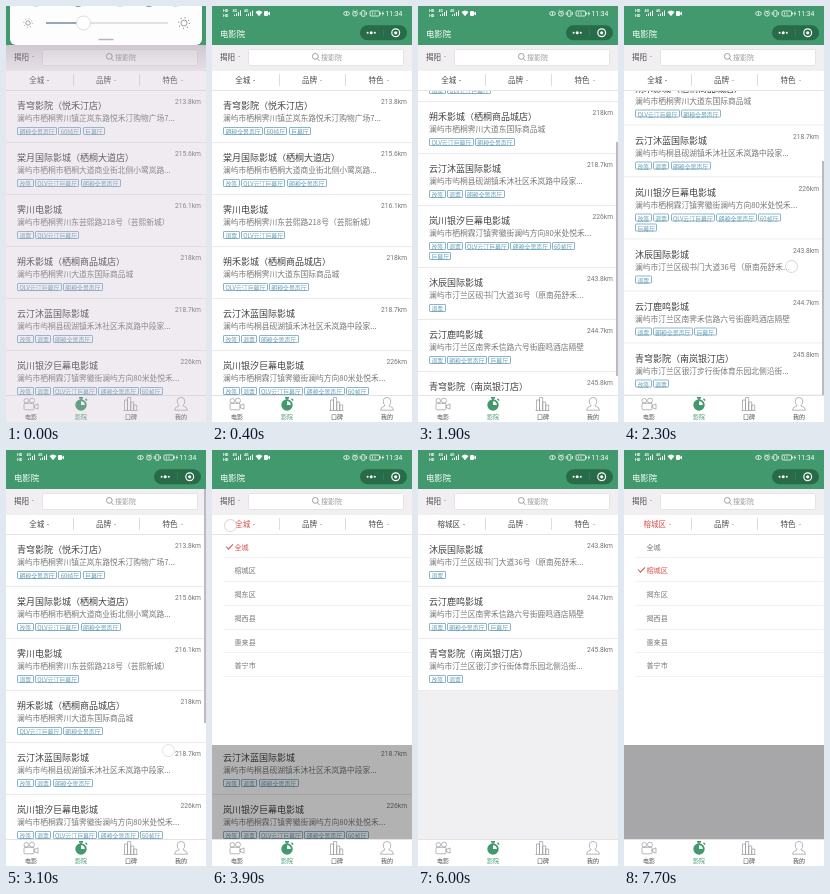
Write an HTML page that moves like this. It is 200x416 px and loops after 8 s.

```html
<!DOCTYPE html>
<html lang="zh-CN">
<head>
<meta charset="utf-8">
<title>电影院</title>
<style>
@property --s { syntax: "<number>"; inherits: true; initial-value: 0; }
html, body { margin: 0; width: 100%; height: 100%; overflow: hidden; }
body { font-family: "Noto Sans CJK SC", "Noto Sans CJK", "Noto Sans", sans-serif; color: #4a4a4a; }
.stage { position: relative; width: 200px; height: 416px; overflow: hidden; background: #f0eff2;
  animation: scroll 8s step-end infinite; }
.stage * { box-sizing: border-box; }
.abs, .view, .item > *, .head, .search, .filter, .menu, .tabs, .thumb, .touch, .wash, .shade { position: absolute; }
svg { position: absolute; left: 0; top: 0; overflow: visible; }

.head { inset: 0 0 auto; height: 39px; background: #41996d; color: #fff; }
.head b { position: absolute; left: 8px; top: 21px; font-size: 8.4px; font-weight: 500; line-height: 12px; }
.search { top: 39px; width: 200px; height: 25.5px; background: #f2eff2; font-size: 7.5px; line-height: 12px; }
.search .box { left: 36px; top: 4px; width: 156px; height: 16.5px; background: #fff; border: .5px solid #e6e3e6; border-radius: 1.5px;
  font-size: 7px; line-height: 15.5px; color: #999; padding-left: 72px; }
.filter { top: 64.5px; width: 200px; height: 20px; background: #fff; border-bottom: .5px solid #e6e4e6; font-size: 7.5px; }
.filter .cell { position: absolute; top: 0; width: 66.6px; height: 17.5px; display: flex; align-items: center; justify-content: center; gap: 3px; }
.line { position: absolute; top: 3px; width: .6px; height: 12px; background: #dcdcdc; }
.caret { border: 1.5px solid transparent; border-top: 1.8px solid; border-bottom: 0; color: #8a8a8a; }
.cell .caret { margin-top: 2.5px; }
.area { animation: active 8s step-end infinite; }
.area .caret { color: inherit; animation: flip 8s step-end infinite; }

.view { top: 84.5px; width: 200px; height: 304.5px; overflow: hidden; }
.list { transform: translateY(calc(var(--s) * -1px)); }
.item { position: relative; height: 52px; background: #fff; border-bottom: .6px solid #ebe9eb; }
.item.tall { height: 62px; }
.item > * { white-space: nowrap; left: 11px; }
.name { top: 8px; font-size: 9px; line-height: 13px; color: #424242; }
.addr { top: 21.5px; font-size: 7.75px; line-height: 12px; color: #777; }
.item .km { left: auto; right: 5px; top: 6px; font: 6.7px/10px Roboto, "Noto Sans", sans-serif; color: #777; }
.tags { top: 36.3px; width: 160px; display: flex; flex-wrap: wrap; gap: 1.5px 1.2px; }
.tags i { font-style: normal; font-size: 5.9px; line-height: 7px; height: 8.6px; padding: 0 1.4px; border: .5px solid #8ab5c9; border-radius: 1px; color: #5f9ab4; }
.thumb { right: 0; top: 39px; width: 1.8px; height: 234px; background: #bcbabc; opacity: 0;
  transform: translateY(calc(var(--s) * .6686px)); animation: thumb 8s step-end infinite; }

.menu { top: 84.5px; width: 200px; height: 304.5px; background: rgba(0,0,0,.3); animation: open 8s step-end infinite; }
.sheet { position: absolute; width: 200px; height: 210.5px; background: #fff; font-size: 7.1px; color: #777; }
.sheet p { position: relative; margin: 0 0 0 11px; padding-left: 11.5px; height: 23.8px; line-height: 24.5px; border-bottom: .5px solid #f3f2f3; }
.sheet .on { color: #d8504a; }
.sheet .on::before { content: ""; position: absolute; left: 2.5px; top: 9px; width: 5.5px; height: 2.8px;
  border: solid; border-width: 0 0 .9px .9px; transform: rotate(-45deg); }

.before { animation: before 8s step-end infinite; }
.after { animation: after 8s step-end infinite; }
.all { animation: all 8s step-end infinite; }
.near { position: absolute; top: 0; width: 200px; animation: near 8s step-end infinite; }

.tabs { top: 389px; width: 200px; height: 27px; background: #fff; border-top: .6px solid #e4e2e4; }
.tabs span { position: absolute; top: 16px; width: 50px; text-align: center; font-size: 6px; font-weight: 500; line-height: 9px; }
.touch { left: -6.5px; top: -6.5px; width: 13px; height: 13px; border-radius: 50%; background: rgba(255,255,255,.5);
  border: .8px solid rgba(170,165,170,.45); animation: touch 8s step-end infinite; }
.wash { inset: 39px 0 0; background: linear-gradient(rgba(0,0,0,.1), transparent 26px), rgba(200,180,202,.27); animation: wash 8s step-end infinite; }
.shade { left: 4px; top: 0; width: 192px; height: 39px; background: #fefdfe; border-radius: 0 0 6px 6px; overflow: hidden;
  animation: shade 8s step-end infinite; }

/* 100 ms = 1.25% */
@keyframes scroll {
  0% { --s: 0 } 16.25% { --s: 12 }
  17.5% { --s: 47; animation-timing-function: steps(2) }
  20% { --s: 100; animation-timing-function: steps(3) }
  23.75% { --s: 145; animation-timing-function: steps(2) }
  26.25% { --s: 160 } 27.5% { --s: 167 } 28.75% { --s: 173.5 }
  33.75% { --s: 150 }
  35% { --s: 105; animation-timing-function: steps(3) }
  38.75%, 100% { --s: 0 }
}
@keyframes thumb { 0% { opacity: 0 } 16.25% { opacity: 1 } 45%, 100% { opacity: 0 } }
@keyframes touch {
  0% { opacity: 0 }
  16.25% { opacity: 1; transform: translate(165px,295px) }
  17.5% { opacity: 1; transform: translate(165px,260px) }
  18.75% { opacity: 1; transform: translate(165px,225px) }
  20% { opacity: 0 }
  27.5% { opacity: 1; transform: translate(167px,290px) }
  28.75% { opacity: 1; transform: translate(167px,260px) }
  30% { opacity: 1; transform: translate(167px,220px) }
  31.25% { opacity: 0 }
  33.75% { opacity: 1; transform: translate(162px,200px); animation-timing-function: steps(4) }
  38.75% { opacity: .7; transform: translate(162px,300px) }
  40% { opacity: .5; transform: translate(162px,306px) }
  41.25% { opacity: 0 }
  47.5% { opacity: 1; transform: translate(18px,75px) }
  50% { opacity: 0 }
  60% { opacity: 1; transform: translate(60px,120px) }
  62.5% { opacity: 0 }
  92.5% { opacity: 1; transform: translate(35px,74px) }
  95%, 100% { opacity: 0 }
}
@keyframes open { 0% { opacity: 0 } 48.75% { opacity: 1 } 62.5% { opacity: 0 } 93.75%, 100% { opacity: 1 } }
@keyframes active { 0% { color: #4a4a4a } 48.75% { color: #d8504a } 62.5% { color: #4a4a4a } 93.75%, 100% { color: #d8504a } }
@keyframes flip { 0% { transform: none } 48.75% { transform: scaleY(-1) } 62.5% { transform: none } 93.75%, 100% { transform: scaleY(-1) } }
@keyframes before { 0% { opacity: 1 } 61.25%, 100% { opacity: 0 } }
@keyframes after { 0% { opacity: 0 } 61.25%, 100% { opacity: 1 } }
@keyframes all { 0% { opacity: 1 } 66.25%, 100% { opacity: 0 } }
@keyframes near { 0% { opacity: 0 } 66.25%, 100% { opacity: 1 } }
@keyframes wash { 0% { opacity: 1; animation-timing-function: steps(4) } 5%, 100% { opacity: 0 } }
@keyframes shade {
  0% { transform: none } 1.25% { transform: translateY(-7px) } 2.5% { transform: translateY(-20px) }
  3.75% { transform: translateY(-33px) } 5%, 100% { transform: translateY(-42px) }
}
</style>
</head>
<body>
<div class="stage">
  <div class="view"><div class="list all"></div><div class="near"></div></div>

  <div class="head">
    <svg width="200" height="39" fill="#fff" font-family="Roboto, sans-serif">
      <g font-size="4" font-weight="700"><text x="11" y="6.4">HD</text><text x="11" y="10.6">HD</text></g>
      <g font-size="3.6" font-weight="700"><text x="20.5" y="6">4G</text><text x="32" y="6">4G</text></g>
      <path id="bars" d="M22 10v-1.5h1V10zM24 10V7.5h1V10zM26 10V6h1V10zM28 10V4.5h1V10z"/>
      <use href="#bars" x="12"/>
      <path d="M43.5 6q3.5-3 7 0L47 10.3z"/>
      <rect x="52" y="5" width="4" height="5" rx="1"/><path d="M56 7l2-1.5v4L56 8z"/>
      <g fill="none" stroke="#fff" stroke-width=".8">
        <ellipse cx="134.5" cy="7.5" rx="2.8" ry="2"/><path d="M134.5 6.2v2.6"/>
        <circle cx="143" cy="7.7" r="2.4"/><path d="M143 6.2v1.6h1M140.5 5l1-.9M145.5 5l-1-.9"/>
        <rect x="149.7" y="4.7" width="3.2" height="5.6" rx=".6"/><path d="M148.2 6v3M154.4 6v3"/>
        <rect x="158" y="5" width="9.5" height="5" rx="1"/><path d="M168.5 6.5v2M160.5 6.5v2M163 6.5v2"/>
      </g>
      <path d="M171.3 4.6l-1.5 3.2h1l-.5 2.6 1.8-3.4h-1z"/>
      <text x="173.5" y="10" font-size="6.8">11:34</text>
      <rect x="148" y="19.3" width="47" height="15" rx="7.5" fill="#286b49"/>
      <circle cx="155.6" cy="26.8" r="1"/><circle cx="159.2" cy="26.8" r="1.5"/><circle cx="162.8" cy="26.8" r="1"/>
      <path d="M171.5 23v7.6" stroke="#4d8468" stroke-width=".5"/>
      <circle cx="183.7" cy="26.8" r="3.9" fill="none" stroke="#fff" stroke-width="1.2"/><circle cx="183.7" cy="26.8" r="1.6"/>
    </svg>
    <b>电影院</b>
  </div>

  <div class="search">
    <span class="abs" style="left:8px;top:6px">揭阳</span>
    <span class="abs caret" style="left:25.5px;top:11.3px"></span>
    <div class="abs box">搜影院</div>
    <svg width="200" height="25" fill="none" stroke="#888" stroke-width=".8"><circle cx="103.3" cy="11.4" r="2.9"/><path d="M105.4 13.6l2.2 2.4"/></svg>
  </div>

  <div class="filter">
    <div class="area">
      <div class="cell before">全城<span class="caret"></span></div>
      <div class="cell after">榕城区<span class="caret"></span></div>
    </div>
    <div class="cell" style="left:66.6px">品牌<span class="caret"></span></div>
    <div class="cell" style="left:133.3px">特色<span class="caret"></span></div>
    <div class="line" style="left:66.5px"></div><div class="line" style="left:133px"></div>
  </div>

  <div class="menu"></div>
  <div class="thumb"></div>

  <div class="tabs">
    <span>电影</span><span style="left:50px;color:#41996d">影院</span><span style="left:100px">口碑</span><span style="left:150px">我的</span>
    <svg width="200" height="16" fill="none" stroke="#999" stroke-width=".7">
      <circle cx="20.3" cy="4.8" r="2.3"/><circle cx="26" cy="4.6" r="2.5"/>
      <rect x="18" y="7.3" width="10" height="6.5" rx="1"/><path d="M28 9.7l4-1.8v5.3l-4-1.8z"/>
      <g fill="#41996d" stroke="none"><circle cx="75" cy="9" r="5.7"/><rect x="73" y="1" width="4" height="1.6"/><rect x="74.3" y="2" width="1.4" height="2"/><path d="M79 3.3l1-1 1.6 1.6-1 1z"/></g>
      <path d="M75 9V5.2a3.8 3.8 0 0 1 3.8 3.8z" fill="#fff" stroke="none"/>
      <path d="M118.5 14.5V4h3v10.5M121.5 14.5v-13h3.2v13M124.7 14.5V6h3v8.5M127.7 14.5V9h3v5.5M117.5 14.5h14"/>
      <path d="M168.5 14.2q0-3.2 4.6-4.4q-1.9-2-1.9-4.8q0-3.5 3.8-3.5t3.8 3.5q0 2.8-1.9 4.8q4.6 1.2 4.6 4.4z"/>
    </svg>
  </div>

  <div class="touch"></div>
  <div class="wash"></div>
  <div class="shade">
    <svg width="192" height="39" fill="none" stroke="#888" stroke-width=".8">
      <g stroke="none" fill="#d9dde0"><circle cx="26" cy="-5" r="6"/><circle cx="110" cy="-5" r="6"/><circle cx="165" cy="-5" r="6"/></g>
      <g stroke="none" fill="#7795ad"><circle cx="68" cy="-5" r="6"/><circle cx="139" cy="-5" r="6"/></g>
      <circle cx="18" cy="17" r="2.2"/><circle cx="18" cy="17" r="4.3" stroke-dasharray="1 2.38"/>
      <circle cx="174" cy="17" r="3"/><circle cx="174" cy="17" r="5.4" stroke-width="1.2" stroke-dasharray="1 3.24"/>
      <path d="M36 17h122" stroke="#d8d8da" stroke-width="1.4"/><path d="M36 17h37" stroke="#7797b0" stroke-width="1.4"/>
      <circle cx="73.5" cy="17" r="7" fill="#fff" stroke="#d4d4d6"/>
      <path d="M89 33.5h14" stroke="#b5b5b7" stroke-width="1.3" stroke-linecap="round"/>
    </svg>
  </div>
</div>

<script>
const tagNames = { a: "改签", b: "退票", c: "QLV云汀巨幕厅", d: "朗穆全景声厅", e: "60帧厅", f: "巨幕厅" };
const cinemas = [
  ["青穹影院（悦禾汀店）", "澜屿市栖桐霁川镇芷岚东路悦禾汀购物广场7...", 213.8, "def"],
  ["棠月国际影城（栖桐大道店）", "澜屿市栖桐市栖桐大道商业街北侧小鹭岚路...", 215.6, "acd"],
  ["霁川电影城", "澜屿市栖桐霁川东芸熙路218号（芸熙新城）", 216.1, "bc"],
  ["朔禾影城（栖桐商品城店）", "澜屿市栖桐霁川大道东国际商品城", 218, "cd"],
  ["云汀沐蓝国际影城", "澜屿市屿桐县砚湖镇禾沐社区禾岚路中段家...", 218.7, "abd"],
  ["岚川银汐巨幕电影城", "澜屿市栖桐霖汀镇霁徽街澜屿方向80米处悦禾...", 226, "abcdef"],
  ["沐辰国际影城", "澜屿市汀兰区砚书门大道36号（原南苑舒禾...", 243.8, "b"],
  ["云汀鹿鸣影城", "澜屿市汀兰区南霁禾信路六号街鹿鸣酒店隔壁", 244.7, "bdf"],
  ["青穹影院（南岚银汀店）", "澜屿市汀兰区银汀步行街体育乐园北侧沿街...", 245.8, "ab"]
];
const areas = ["全城", "榕城区", "揭东区", "揭西县", "惠来县", "普宁市"];

const card = ([name, addr, km, tags]) =>
  `<div class="item${tags.length > 5 ? " tall" : ""}"><div class="name">${name}</div><div class="addr">${addr}</div>
   <div class="km">${km}km</div><div class="tags">${[...tags].map(k => `<i>${tagNames[k]}</i>`).join("")}</div></div>`;
const sheet = (state, chosen) =>
  `<div class="sheet ${state}">${areas.map((a, i) => `<p class="${i === chosen ? "on" : ""}">${a}</p>`).join("")}</div>`;

const fill = (sel, html) => { document.querySelector(sel).innerHTML = html; };
fill(".list", cinemas.map(card).join(""));
fill(".near", cinemas.slice(6).map(card).join(""));
fill(".menu", sheet("before", 0) + sheet("after", 1));
</script>
</body>
</html>
```
